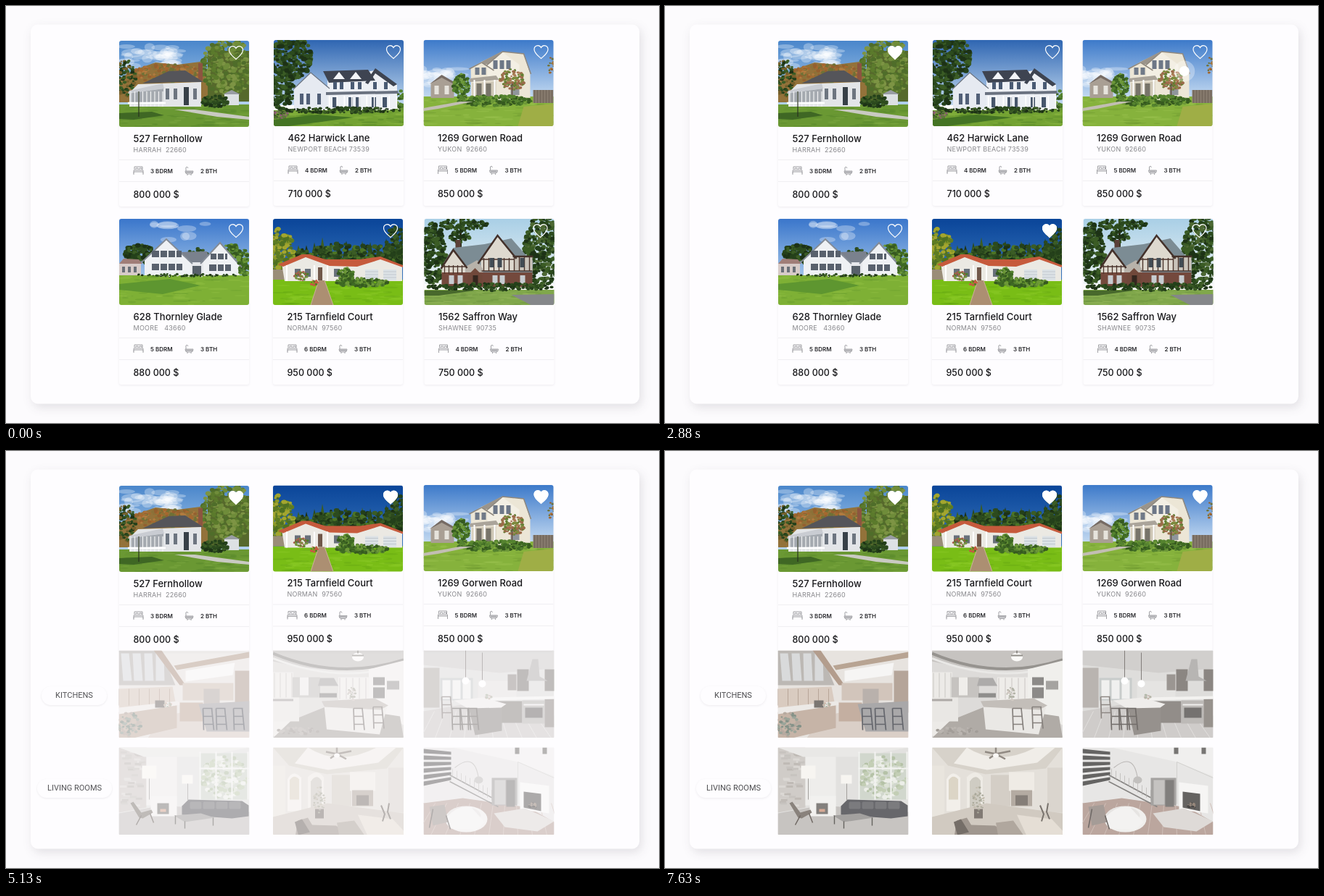
Write an HTML page that moves like this. It is 900 px wide and 576 px high and loops after 7750 ms.

```html
<!DOCTYPE html>
<html lang="en">
<head>
<meta charset="utf-8">
<title>Home picks</title>
<style>
html, body { margin: 0; width: 100%; height: 100%; overflow: hidden; background: #fcfbfd; }
svg { display: block; }
text { font-family: Inter, "Open Sans", sans-serif; white-space: pre; }
.title { font-size: 13px; font-weight: 500; fill: #17171a; }
.city { font-size: 9px; letter-spacing: .25px; fill: #87878b; }
.fact { font-size: 8px; font-weight: 600; fill: #2a2a2e; }
.price { font-size: 12.5px; font-weight: 500; fill: #17171a; }
.label { font: 11px Roboto, sans-serif; fill: #4d4d50; text-anchor: middle; }
.panel { filter: drop-shadow(3px 5px 7px rgba(40, 30, 50, .12)); }
.soft { filter: drop-shadow(0 1px 1.5px rgba(40, 30, 50, .08)); }
</style>
</head>
<body>
<svg id="stage" width="900" height="576" viewBox="0 0 900 576"></svg>
<script>
const LOOP = 7750;
let seed = 7;
const rnd = () => (seed = seed * 16807 % 2147483647) / 2147483647;
const pick = list => list[Math.floor(rnd() * list.length)];
const n1 = v => v.toFixed(1);

// Drawing helpers that return SVG markup
const poly = (c, d) => `<path fill="${c}" d="M${d}z"/>`;
const box = (c, x, y, w, h, more = '') => `<rect fill="${c}" x="${x}" y="${y}" width="${w}" height="${h}" ${more}/>`;
const oval = (c, x, y, rx, ry, a = 1) =>
  `<ellipse fill="${c}" cx="${n1(x)}" cy="${n1(y)}" rx="${n1(rx)}" ry="${n1(ry)}" opacity="${a}"/>`;
const line = (c, w, d) => `<path fill="none" stroke="${c}" stroke-width="${w}" d="M${d}"/>`;
const row = (n, f) => Array.from({ length: n }, (_, i) => f(i)).join('');
const boxes = (c, y, w, h, xs) => xs.map(x => box(c, x, y, w, h)).join('');
const text = (cls, x, y, s) => `<text class="${cls}" x="${x}" y="${y}">${s}</text>`;
const shade = (id, top, low) =>
  `<linearGradient id="${id}" x2="0" y2="1"><stop stop-color="${top}"/><stop offset="1" stop-color="${low}"/></linearGradient>`;

const leaves = (x, y, rx, ry, n, cols, s = 3) => row(n * 1.8 | 0, () => {
  const a = rnd() * 6.283, r = Math.sqrt(rnd()), k = s * (.4 + rnd() * .6);
  return oval(pick(cols), x + Math.cos(a) * r * rx, y + Math.sin(a) * r * ry, k, k * .8);
});
const lawn = (y, c, dark, light) => box(c, 0, y, 180, 121 - y) + row(70, () =>
  oval(pick([dark, light]), rnd() * 180, y + 2 + rnd() * (117 - y), 4 + rnd() * 10, .6 + rnd(), .3));
const clouds = (x, y, rx, ry, n) => row(n, () =>
  oval('#fff', x + (rnd() - .5) * 2 * rx, y + (rnd() - .5) * 2 * ry, 6 + rnd() * 10, 2 + rnd() * 4, .3));
const sky = (id, top, low) => shade(id, top, low) + box(`url(#${id})`, 0, 0, 180, 90);

const DARK = ['#1d3216', '#2c4a1e', '#3b5c25', '#24401a'];
const MID = ['#3f6a24', '#55832f', '#6d9838', '#36591f'];
const OLIVE = ['#5b7a2c', '#6f8c3a', '#4f6d2a', '#7d9444'];
const AUTUMN = ['#a5682f', '#8b7138', '#b07a3f', '#6f7136', '#94602f'];

const houses = [
  () => sky('s1', '#4a86cb', '#b5d3ee') + clouds(42, 22, 38, 14, 42) +
    poly('#93723a', '0 52L22 40 50 30 80 33 112 29 130 60 130 85 0 85') +
    leaves(70, 45, 55, 12, 110, AUTUMN, 3) + leaves(8, 52, 15, 26, 60, [...DARK, '#77602c'], 3) +
    box('#56692c', 122, 14, 58, 70) + leaves(150, 36, 36, 40, 190, OLIVE, 4) +
    lawn(88, '#6a9833', '#4b7a25', '#86ae46') +
    poly('#e3e5e8', '26 60L113 57 113 91 14 91 14 72') + poly('#a5aab0', '15 72L61 66 61 84 15 86') +
    box('#8c5540', 109, 31, 6, 24) + poly('#55555a', '32 59L68 42 91 41 116 57 78 57') + poly('#c9ccd2', '14 69L60 59 62 66 12 73') +
    boxes('#6d7580', 66, 5, 15, [64, 75, 102]) + box('#384048', 89, 64, 7, 25) +
    row(9, i => line('#f2f3f4', 1.2, `${16 + i * 5.5} 70V91`)) + line('#fff', 2.5, '12 86H64') +
    box('#dde1e4', 145, 73, 20, 16) + poly('#999da4', '143 74L155 68 167 74') +
    leaves(132, 84, 19, 8, 50, DARK, 3) + poly('#c9cac2', '76 95L104 95 179 105 179 109 135 105') +
    poly('#3f6724', '0 100L45 98 62 103 20 109 0 108') + line('#29321f', 1.2, '27 70V105'),
  () => sky('s2', '#2f66b2', '#c3daf1') +
    leaves(24, 24, 28, 30, 150, DARK, 4) + leaves(10, 66, 18, 32, 90, DARK, 4) + leaves(172, 84, 9, 15, 30, MID, 3) +
    poly('#e6eaf1', '28 67L51 45 76 67 76 96 28 96') + poly('#edf0f5', '74 54L139 42 170 62 170 95 74 95') +
    poly('#3e4451', '68 43L130 41 140 56 76 59') + poly('#3e4451', '126 59L140 39 170 61 165 64 140 46 130 61') +
    poly('#f3f5f8', '82 54L90 44 98 54') + poly('#f3f5f8', '105 54L113 44 121 54') +
    line('#6c7480', 1.2, '27 68L51 45 77 67') + boxes('#495a73', 58, 5, 10, [82, 91, 106, 116, 137, 152]) +
    boxes('#526078', 74, 5, 15, [36, 45, 60]) + poly('#6a7280', '72 72L171 70 172 74 72 76') +
    boxes('#47566b', 79, 6, 14, [81, 103, 113, 135, 150]) + row(10, i => box('#fff', 76 + i * 10.3, 77, 1.6, 18)) +
    lawn(97, '#73a232', '#447522', '#91bd46') + leaves(90, 97, 85, 4, 90, DARK, 3) +
    leaves(8, 103, 12, 6, 25, ['#8a5d70', '#5f7a3c', '#3a5527'], 2.5) + poly('#447424', '0 110L60 103 110 107 20 119 0 119'),
  () => sky('s3', '#3d7aca', '#d5e6f6') + clouds(25, 50, 35, 12, 30) +
    lawn(78, '#86b23c', '#648f2b', '#a4c958') +
    poly('#a99f94', '10 60L24 49 42 58 42 80 10 80') + poly('#766b64', '8 61L25 48 44 59 40 60 25 52') +
    boxes('#e6e3dc', 63, 6, 12, [15, 29]) +
    poly('#ece6d6', '65 39L80 30 109 16 138 19 147 47 147 84 66 84') + poly('#f3efe4', '88 34L109 17 132 34 132 56 88 56') +
    poly('#9a948b', '80 30L109 15 90 33 84 34') + line('#8f887e', 1.5, '63 40L80 31 97 42M87 35L109 16 138 19 148 47') +
    poly('#aaa49a', '64 53L100 49 104 55 64 58') + poly('#cfc7b6', '67 59L100 57 100 83 67 83') + boxes('#6d7787', 28, 6, 12, [96, 105, 114]) +
    boxes('#707a88', 38, 6, 10, [71, 80]) + boxes('#77746a', 60, 7, 21, [73, 86]) + boxes('#fff', 55, 2, 29, [69, 83, 97]) +
    box('#8f959c', 120, 60, 12, 16) + leaves(52, 64, 11, 17, 75, MID, 3) +
    leaves(122, 55, 17, 15, 80, ['#9c6a4b', '#7e8a3e', '#5f7d31', '#ad7c58'], 2.5) + line('#645040', 1.5, '122 60V84') +
    box('#84786b', 151, 69, 28, 18) + row(7, i => line('#6a5f53', .8, `${153 + i * 4} 69V87`)) +
    leaves(98, 84, 52, 7, 115, MID, 3.5) + leaves(177, 35, 5, 12, 12, AUTUMN, 2) +
    poly('#c2beb3', '0 94L50 85 68 85 20 95 0 98') + poly('#9fae46', '138 92L179 88 179 119 130 119'),
  () => sky('s4', '#3a76cb', '#b0cfee') + clouds(75, 18, 55, 12, 10) +
    leaves(27, 49, 20, 14, 85, DARK, 4) + leaves(153, 53, 26, 17, 100, MID, 4) + leaves(108, 49, 14, 8, 30, DARK, 3) +
    box('#d7cbc8', 0, 61, 30, 18) + poly('#a07e78', '0 62L6 55 27 56 32 62') + boxes('#6b7078', 66, 4, 8, [4, 12, 20]) +
    box('#e6e8ec', 90, 58, 33, 20) + poly('#7a818d', '84 46L121 45 126 60 92 60') +
    poly('#eff1f4', '35 57L65 29 99 60 99 79 35 79') + line('#858c96', 2, '31 60L65 28 101 62') +
    poly('#eff1f4', '116 58L139 34 166 64 166 79 116 79') + line('#858c96', 2, '112 62L139 33 169 67') +
    box('#59616d', 45, 44, 41, 9) + box('#59616d', 45, 62, 42, 9) + box('#59616d', 126, 48, 23, 8) +
    box('#59616d', 124, 63, 30, 9) + boxes('#eef0f2', 43, 2, 30, [55, 66, 77, 134, 144]) + box('#57606a', 101, 65, 12, 13) +
    lawn(78, '#7eb035', '#5a9028', '#9bc84a') + leaves(88, 78, 78, 2, 45, [...DARK, '#dedfdc'], 2) +
    poly('#5e9630', '0 90L70 83 112 92 60 104 0 98') + leaves(172, 67, 8, 11, 25, MID, 3),
  () => sky('s5', '#0a4599', '#3c79bf') +
    row(14, i => poly(pick(DARK), `${28 + i * 11} 65L${35 + i * 11} ${n1(23 + rnd() * 17)} ${43 + i * 11} 65`)) +
    leaves(105, 50, 79, 16, 170, [...DARK, '#4c7426'], 4) +
    leaves(170, 37, 14, 27, 65, DARK, 4) + leaves(10, 44, 18, 31, 110, ['#8c9a28', '#a3a52f', '#5e7c22', '#4f7022'], 4) +
    lawn(84, '#79bd16', '#5b9c12', '#95cf32') + box('#9a8d78', 0, 70, 20, 14) +
    poly('#ebe9e3', '12 62L45 51 80 62 115 64 148 54 178 66 178 86 16 86') +
    poly('#c65a3c', '7 63L40 49 50 49 72 56 120 56 148 52 179 64 179 67 148 56 116 66 78 65 45 53 14 66') +
    boxes('#dce2e6', 70, 18, 15, [127, 152]) +
    row(3, i => line('#b7bec4', .7, `127 ${73 + i * 4}H145M152 ${73 + i * 4}H170`)) + boxes('#68707a', 69, 8, 11, [30, 44, 84]) +
    box('#70584a', 62, 67, 6, 18) + boxes('#fff', 64, 2, 22, [18, 56, 74]) +
    leaves(101, 77, 11, 9, 45, MID, 3) + leaves(122, 88, 38, 6, 95, MID, 3) + leaves(39, 79, 10, 6, 32, ['#4f7d2a', '#b0534d', '#75913d'], 2) +
    poly('#ac8f72', '63 85L71 85 83 119 52 119') + line('#c9b397', 1, '63 85L52 119M71 85L83 119') + leaves(57, 88, 5, 4, 16, ['#cc5544', '#527f25'], 2),
  () => sky('s6', '#a9cfe6', '#edf3f5') +
    leaves(12, 47, 18, 43, 130, DARK, 4) + line('#30301f', 3, '50 0V45') + leaves(54, 8, 33, 8, 75, DARK, 3) + leaves(49, 25, 15, 8, 35, DARK, 3) +
    leaves(163, 45, 25, 50, 190, [...DARK, '#4d6833'], 4) + box('#5b4038', 43, 29, 7, 22) +
    poly('#7c8c94', '27 60L40 40 83 35 120 27 140 50 150 58 148 92 24 92') +
    poly('#ded9cf', '24 66L40 44 57 66 57 76 24 76') + poly('#ded9cf', '78 58L101 25 124 53 124 72 78 72') +
    box('#c9c3ba', 124, 52, 25, 20) + poly('#b8b2aa', '57 66L73 57 81 70 81 77 57 77') + box('#74493d', 24, 74, 125, 20) +
    line('#44312a', 2.5, '23 69L40 43 59 68M74 62L101 23 127 55M122 52H150') +
    row(10, i => line('#4b352c', 1.4, `${82 + i * 7} ${i < 6 ? 54 : 53}V72`)) +
    row(5, i => line('#4b352c', 1.3, `${28 + i * 6} 64V76`)) + line('#4b352c', 1.6, '24 66H57M79 56H124M79 72H149') +
    boxes('#424c54', 54, 6, 13, [90, 101, 132]) + boxes('#c7ccd0', 78, 7, 12, [34, 46, 94, 104, 132]) +
    poly('#70483a', '60 92L60 78 70 68 80 78 80 92') + box('#34271f', 67, 78, 7, 15) +
    lawn(98, '#80a74b', '#5d8637', '#9ebc63') + leaves(90, 94, 88, 5, 120, DARK, 3) +
    poly('#85878a', '120 105L179 104 179 119 147 119') + poly('#48692c', '0 99L70 99 20 106 0 106')
];

const stool = (x, y, c) => line(c, 1.7, `${x} ${y}L${x + 1} ${y + 30}M${x + 12} ${y}L${x + 15} ${y + 30}M${x} ${y}H${x + 13}M${x} ${y + 11}H${x + 14}M${x} ${y + 22}H${x + 15}`);
const rooms = [
  () => box('#e7e3df', 0, 0, 180, 121) + poly('#bcb8b4', '0 0L58 0 78 48 0 48') +
    row(4, i => poly('#d9dadb', `${3 + i * 16} 4L${14 + i * 16} 4 ${18 + i * 15} 42 ${6 + i * 15} 42`)) +
    poly('#b39d8d', '48 0L59 0 92 48 84 48') + poly('#b8a493', '76 21L180 2 180 10 80 27') + poly('#f6f5f4', '92 28L160 17 157 34 92 43') +
    box('#d2c5bb', 88, 45, 70, 24) + box('#b9b1ac', 117, 53, 22, 22) + box('#b5a599', 160, 28, 20, 58) +
    poly('#d9cbc0', '0 53L74 50 78 71 0 80') + row(6, i => line('#b8a699', 1, `${i * 14} 53V76`)) +
    poly('#dacfc7', '60 91L115 80 180 96 180 121 40 121') + poly('#c6b4a7', '0 85L80 73 80 107 20 121 0 121') +
    poly('#ece9e6', '0 79L82 70 86 75 0 88') + box('#c4afa1', 84, 72, 32, 26) + box('#7b7672', 50, 69, 13, 10) +
    poly('#a9a8a9', '110 74L180 70 180 112 121 112') + [116, 134, 158].map(x => stool(x, 80, '#64666c')).join('') +
    leaves(13, 102, 17, 17, 45, ['#9ba59a', '#b6aaa0', '#859288'], 3) + leaves(67, 75, 5, 3, 10, ['#d1b8ac', '#a9b2a2'], 2),
  () => box('#dddbd9', 0, 0, 180, 121) + poly('#c6c3c0', '0 0H180V15Q92 38 0 15') + line('#96938f', 4, '0 4Q90 42 180 13') +
    line('#e9e8e6', 3, '0 11Q90 47 180 20') + oval('#fbfaf8', 117, 9, 8, 6) + line('#908d88', 2, '117 0V4M109 7H125') +
    box('#eceae7', 0, 30, 28, 88) + row(4, i => line('#c2bfbb', .8, `${i * 8 + 2} 31V67`)) + box('#c6c3c0', 27, 37, 38, 28) + box('#efedea', 37, 37, 12, 25) +
    poly('#adabaa', '65 38L84 38 90 49 62 49') + box('#8f8e8c', 64, 59, 24, 6) + box('#eeece9', 90, 37, 42, 32) + row(5, i => line('#c0bdb9', .8, `${92 + i * 9} 38V67`)) +
    poly('#f0efec', '132 26L180 14 180 103 132 79') + box('#8c8a88', 138, 37, 16, 11) + box('#8c8a88', 138, 51, 16, 15) + box('#a5a3a0', 157, 42, 17, 12) +
    poly('#b0aba6', '25 97L77 76 175 91 180 121 0 121') + box('#e9e7e4', 1, 65, 35, 33) + box('#aeaaa7', 0, 67, 28, 3) +
    poly('#eae8e5', '70 71L142 67 157 79 147 116 74 109') + poly('#c3beb9', '67 70L140 66 159 76 148 82 71 78') +
    stool(111, 80, '#86817d') + stool(138, 78, '#86817d') + leaves(109, 60, 6, 9, 18, ['#b1b2a6', '#d2cac3'], 2) + leaves(33, 111, 30, 5, 20, ['#a29d98', '#bab5b0'], 3),
  () => box('#dedddb', 0, 0, 180, 121) + poly('#d1cfcd', '0 0H180V25L105 31 0 20') + box('#c8cccb', 23, 38, 45, 31) +
    boxes('#f0f0ef', 41, 11, 26, [26, 40, 54]) + box('#b9b4b0', 0, 24, 22, 55) + box('#e5e4e2', 75, 42, 53, 27) +
    boxes('#8b8682', 26, 16, 30, [129, 167]) + box('#9b9692', 116, 33, 12, 22) + poly('#b7b5b3', '150 12L158 12 160 36 171 42 142 42') +
    poly('#cfccca', '0 84L70 72 180 90 180 121 0 121') + row(12, i => line('#e1dfdd', 1, `${i * 15} 84L${i * 20 - 24} 121`)) +
    box('#928d89', 91, 70, 45, 30) + box('#bdbab7', 136, 69, 31, 32) + box('#757270', 140, 79, 24, 14) + line('#efeeec', 2, '138 75H166') +
    box('#97928d', 167, 67, 13, 39) + line('#f3f2f0', 4, '87 67L180 65') +
    poly('#96918d', '62 78L108 78 108 111 71 117') + poly('#efedeb', '42 69L82 65 114 74 107 79 61 80') +
    row(3, i => stool(39 + i * 11, 80, '#716c69')) + stool(25, 64, '#8d8783') +
    line('#827e7b', 1, '58 0V38M81 3V41') + oval('#fff', 58, 42, 5, 5) + oval('#fff', 81, 46, 5, 5) + leaves(90, 64, 5, 3, 10, ['#c6b6ad', '#b2b8aa'], 2),
  () => box('#e2e1df', 0, 0, 180, 121) + poly('#d0ccc8', '0 0H38V83L0 90') + row(40, () => box(pick(['#bfbab5', '#dbd8d4', '#c7c3bf']), n1(rnd() * 28), n1(rnd() * 82), 9, 3)) +
    poly('#eeedeb', '38 0H80V80H38') + poly('#e9e8e6', '0 0H180L112 13H35') + box('#d1d7cd', 111, 8, 68, 64) +
    leaves(146, 41, 32, 29, 95, ['#c3ceb5', '#dce2d5', '#b5c2a7', '#eceee8'], 4) + row(4, i => line('#f3f3f1', 2, `${112 + i * 22} 6V72`)) + line('#f3f3f1', 2, '111 29H180') +
    poly('#c7c4c1', '0 91L60 80 180 89 180 121 0 121') + box('#f2f1ef', 44, 67, 36, 28) + box('#83807d', 53, 77, 16, 15) + box('#d6a995', 57, 85, 8, 4) +
    poly('#67676b', '87 81L96 72 170 74 179 80 179 95 156 98 87 93') + row(4, i => box('#7b7b7e', 98 + i * 18, 75, 16, 10, 'rx="2"')) +
    poly('#a3a19f', '76 94L113 91 132 97 91 103') + line('#65635f', 1.4, '78 94V106M91 102V112M130 97V108') +
    poly('#89827c', '16 77L20 75 31 90 45 86 47 90 33 98 28 97') + line('#706964', 1.5, '31 94L24 107M43 91L48 104') +
    box('#f7f5f1', 32, 25, 20, 18) + box('#f7f5f1', 87, 38, 15, 12) + line('#a3a09c', 1, '42 43V72M95 50V73'),
  () => box('#e4e0da', 0, 0, 180, 121) + poly('#d7d2ca', '0 0H180L157 29 74 37 22 25') + poly('#f0ede8', '48 0Q90 27 143 0L170 0 145 21 76 31 30 22') +
    poly('#f2efea', '20 88V44Q28 29 39 42V88') + poly('#dcd5c6', '23 72V45Q29 36 36 44V72') + poly('#eeebe5', '48 88V41Q60 28 70 41V88') + poly('#cfccc3', '52 86V47Q60 35 67 46V86') +
    box('#e9e5de', 0, 25, 17, 72) + box('#d4cec6', 81, 38, 27, 43) + box('#efebe5', 106, 34, 35, 26) + box('#b4aba2', 109, 59, 29, 22) + box('#857e78', 115, 66, 17, 14) +
    box('#dad5ce', 159, 28, 21, 62) + poly('#d1cac1', '0 96L75 77 180 91 180 121 0 121') +
    poly('#a0978f', '34 101L48 97 54 107 87 108 105 121 31 121') + poly('#756e68', '30 103L40 99 51 117 35 121') + poly('#b0a79e', '88 104L112 101 126 121 91 121') +
    poly('#e5ded5', '117 93L165 99 180 115 180 121 130 121') + line('#79736d', 2, '149 80L154 92 151 102M160 77L158 89 162 99') + box('#817a74', 58, 85, 12, 13) +
    leaves(64, 72, 9, 18, 25, ['#aaa99b', '#c4beb0'], 2) + line('#918a83', 2.5, '88 0V8M73 6L88 9 108 5M79 15L88 9 101 16') + oval('#faf8f5', 88, 11, 4, 3),
  () => box('#e7e6e5', 0, 0, 180, 121) + poly('#f0efee', '40 0H180V40L130 20') + line('#d1d0ce', 1, '130 20V78M130 20L180 42') +
    poly('#bba69e', '0 77L54 70 145 83 180 103 180 121 0 121') + row(12, i => line('#cebeb7', 1, `${i * 16} 77L${i * 20 - 30} 121`)) +
    row(6, i => poly('#656463', `0 ${i * 9 + 2}L38 ${i * 7 + 6} 38 ${i * 7 + 10} 0 ${i * 9 + 8}`)) + line('#858381', 1.5, '36 38L112 79M36 47L103 82') +
    row(11, i => line('#b6b4b2', .7, `${40 + i * 6} ${n1(29 + i * 3.3)}V${n1(40 + i * 3.7)}`)) +
    box('#a4a2a0', 94, 42, 35, 38) + box('#c5c3c1', 98, 45, 15, 34) + box('#817f7d', 114, 45, 12, 37) +
    poly('#f6f5f4', '133 48L173 53 173 91 133 86') + poly('#656361', '138 61L162 64 162 88 138 83') + leaves(151, 80, 7, 4, 12, ['#96877b', '#494746'], 2) +
    poly('#dedad7', '97 91L140 84 180 102 157 116 112 110') + oval('#f0efed', 59, 99, 29, 18) + oval('#e6e4e2', 56, 94, 23, 12) +
    poly('#f3f2f1', '32 96Q48 78 66 83L84 103 73 114 38 112') + poly('#a59c97', '8 82L29 79 34 103 13 108') + line('#6e6865', 1.5, '13 85L8 111M31 94L37 113') +
    line('#bbb8b6', 1.1, '43 28Q71 5 76 44') + oval('#c2c0be', 76, 45, 6, 5) + boxes('#777573', 0, 6, 9, [126, 164])
];

const bed = line('#a0a0a4', 1, '21 178V174H32V178M20 183V179H33V183M20 181H33M20 185V182M33 185V182M23 178V176H26V178M28 178V176H31V178');
const tub = line('#a0a0a4', 1, '92 180V175Q94 173 95 176M91 180H102Q102 184 99 184H94Q91 184 91 180M94 184V186M99 184V186') + box('#b5b5b9', 92, 180, 9, 3);
const heartPath = '0 9C-3 6-9.5 2-9.5-3.5-9.5-9.5-2.5-10.5 0-6 2.5-10.5 9.5-9.5 9.5-3.5 9.5 2 3 6 0 9z';

// x, y, heart x, name, city, bedrooms, baths, price
const homes = [
  [156, 48, 161, '527 Fernhollow', 'HARRAH  22660', 3, 2, '800 000 $'],
  [369, 47, 165, '462 Harwick Lane', 'NEWPORT BEACH 73539', 4, 2, '710 000 $'],
  [575.5, 47, 162, '1269 Gorwen Road', 'YUKON  92660', 5, 3, '850 000 $'],
  [156, 294, 161, '628 Thornley Glade', 'MOORE   43660', 5, 3, '880 000 $'],
  [368, 294, 162, '215 Tarnfield Court', 'NORMAN  97560', 6, 3, '950 000 $'],
  [576.5, 294, 160, '1562 Saffron Way', 'SHAWNEE  90735', 4, 2, '750 000 $']
];
const card = ([x, y, hx, name, city, beds, baths, price], i) =>
  `<g id="card${i}" transform="translate(${x} ${y})">` +
  box('#fefdff', 0, 0, 179, 229, 'rx="3" class="soft"') + `<g clip-path="url(#photo)">${houses[i]()}</g>` +
  text('title', 19.5, 139.5, name) + text('city', 19.5, 153.5, city) + line('#f0eff2', 1, '0 164.5H179M0 194.5H179') +
  bed + tub + text('fact', 43, 182.5, beds + ' BDRM') + text('fact', 112, 182.5, baths + ' BTH') + text('price', 19.5, 216.5, price) +
  `<g transform="translate(${hx} 16.5)"><path d="M${heartPath}" fill="none" stroke="#fff" stroke-width="1.2"/><path id="heart${i}" d="M${heartPath}" fill="#fff" stroke="#fff"/></g></g>`;
const room = (draw, i) =>
  `<g transform="translate(${[155.5, 368, 575.5][i % 3]} ${i < 3 ? 275.5 : 409.5})" clip-path="url(#room)">${draw()}</g>`;
const pill = (x, y, w, s) => box('#fefdff', x, y, w, 26, 'rx="13" class="soft"') + text('label', x + w / 2, y + 16, s);

const stage = document.getElementById('stage');
stage.innerHTML =
  '<defs><clipPath id="photo"><rect width="179" height="119" rx="3"/></clipPath><clipPath id="room"><rect width="180" height="120.5" rx="1"/></clipPath></defs>' +
  box('#fcfbfd', 0, 0, 900, 576) + box('#fefdff', 34, 25.5, 839, 524, 'rx="10" class="panel"') +
  [0, 1, 2, 3, 5, 4].map(i => card(homes[i], i)).join('') +
  `<g id="rooms">${rooms.map(room).join('')}</g>` +
  `<g id="labels">${pill(49, 325, 90, 'KITCHENS')}${pill(43, 453, 103, 'LIVING ROOMS')}</g>` +
  '<g id="cursor"><circle r="14.5" fill="#fff" opacity=".32"/><circle r="7" fill="#fff"/></g>';

const el = id => document.getElementById(id);
const clamp = v => Math.max(0, Math.min(1, v));
const span = (t, a, b) => clamp((t - a) / (b - a));
const ease = p => p < .5 ? 4 * p ** 3 : 1 - 4 * (1 - p) ** 3;
const fade = (id, v) => el(id).setAttribute('opacity', v.toFixed(3));
const move = (id, x, y) => el(id).setAttribute('transform', `translate(${x.toFixed(2)} ${y.toFixed(2)})`);

// Pointer legs: start, end, from, bend, to
const legs = [
  [150, 780, [236, 200], [276, 132], [317, 64.5]],
  [1040, 2040, [317, 64.5], [460, 440], [530, 310.5]],
  [2250, 3150, [530, 310.5], [634, 187], [738, 63.5]]
];
const fills = { 0: 820, 4: 2080, 2: 3190 };

function draw(t) {
  const [a, b, from, bend, to] = legs.findLast(l => t >= l[0]) || legs[0];
  const k = ease(span(t, a, b));
  const at = i => (1 - k) ** 2 * from[i] + 2 * k * (1 - k) * bend[i] + k * k * to[i];
  move('cursor', at(0), at(1));
  fade('cursor', span(t, 150, 350) * (1 - span(t, 3250, 3450)));
  homes.forEach((_, i) => fade('heart' + i, i in fills ? span(t, fills[i], fills[i] + 120) : 0));
  const gone = span(t, 3750, 4700);
  [1, 3, 5].forEach(i => fade('card' + i, 1 - gone));
  move('card4', 368, 294 - 246.5 * ease(span(t, 3750, 4800)));
  fade('rooms', span(t, 4700, 5500));
  fade('labels', span(t, 4650, 5150));
}

const begin = performance.now();
function tick() {
  draw((performance.now() - begin) % LOOP);
  requestAnimationFrame(tick);
}
tick();
</script>
</body>
</html>
```
